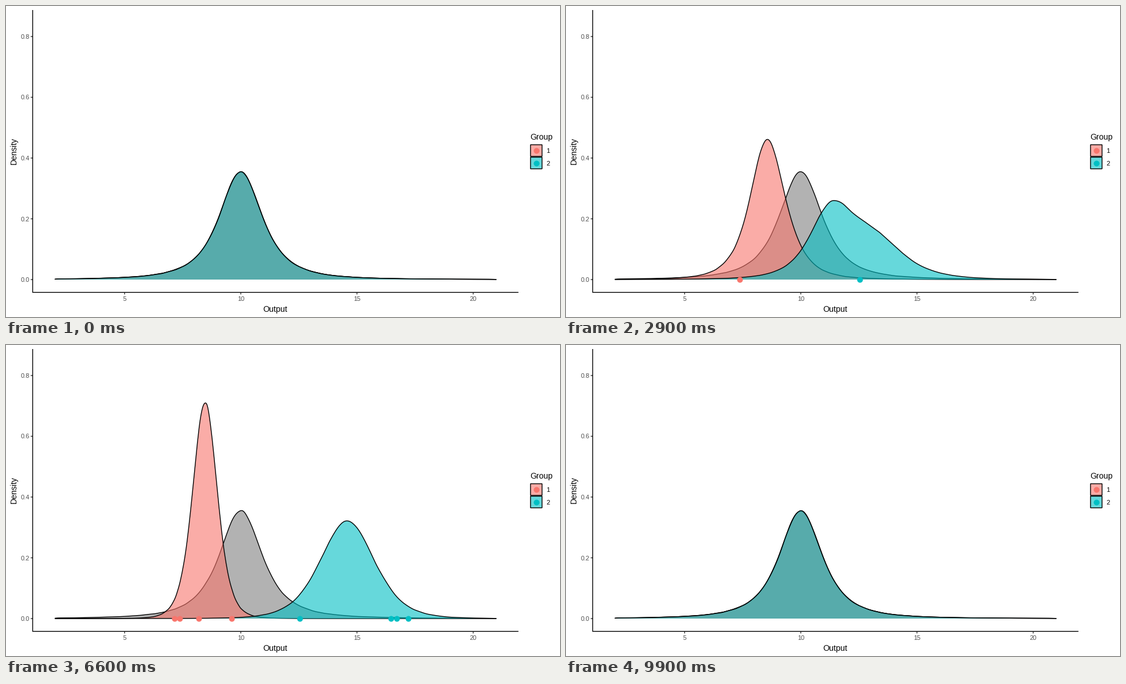
These frames come from a looping animation (960 px wide and 540 px high, 10 s). A matplotlib script:

```python
import numpy as np
import matplotlib.pyplot as plt
from matplotlib.animation import FuncAnimation
from matplotlib.patches import Polygon, Rectangle

W, H, DPI = 960, 540, 60
PT = 72 / DPI  # points per pixel
FRAMES, INTERVAL = 100, 100
STARTS = [9, 26, 43, 59, 76, 92]  # first frame of each transition
STEPS = 8
STATES = len(STARTS)

RED, CYAN, GREY = "#F8766D", "#00BFC4", "#4D4D4D"
LINE, DOT, TITLE, SMALL = 1.4, 10, 14, 11
plt.rcParams["font.family"] = ["Liberation Sans", "DejaVu Sans"]

# Observations, one more per state
OBS = {
    "red": [7.366, 8.18, 7.16, 9.594, 8.328],
    "cyan": [12.535, 16.458, 17.21, 16.72, 14.076],
}
STYLE = {"prior": ("black", .3), "red": (RED, .6), "cyan": (CYAN, .6)}

grid = np.linspace(2, 21, 512)
DX = grid[1] - grid[0]
rng = np.random.default_rng(7)


def smooth(y, bw):
    k = np.arange(-40, 41) * DX
    kernel = np.exp(-.5 * (k / bw) ** 2)
    return np.convolve(y, kernel / kernel.sum(), "same")


def posterior(data):
    """Degrees of freedom, centre and scale of the mean's Student t."""
    n = len(data)
    kappa, alpha, beta, mu = 1 + n, 1 + n / 2, 1.0, 10.0
    if n:
        x = np.array(data)
        m = x.mean()
        beta += .5 * ((x - m) ** 2).sum() + n * (m - 10) ** 2 / (2 * kappa)
        mu = (10 + n * m) / kappa
    return 2 * alpha, mu, np.sqrt(beta / (alpha * kappa))


def density(data):
    """Smoothed posterior density with a little sampling noise."""
    nu, mu, s = posterior(data)
    bw = .1 * s
    y = (1 + ((grid - mu) / s) ** 2 / nu) ** (-(nu + 1) / 2)
    y = smooth(y / (y.sum() * DX), bw)
    noise = smooth(rng.normal(size=grid.size), bw)
    y += .003 * noise / noise.std() * np.sqrt(y / s) / 1.7
    return np.maximum(y, 0)


curves = {g: [density(OBS.get(g, [])[:n]) for n in range(STATES)]
          for g in STYLE}


def px(v):
    return 4.15 + 40.27 * np.asarray(v)


def py(v):
    return 475 - 527.5 * np.asarray(v)


fig = plt.figure(figsize=(W / DPI, H / DPI), dpi=DPI, facecolor="white")
ax = fig.add_axes([0, 0, 1, 1])
ax.set_xlim(0, W)
ax.set_ylim(H, 0)
ax.axis("off")


def stroke(xs, ys, color="black", z=1):
    line, = ax.plot(xs, ys, color=color, lw=LINE * PT, zorder=z, snap=False,
                    solid_capstyle="butt", solid_joinstyle="round")
    return line


def dots(xs, ys, color, z):
    line, = ax.plot(xs, ys, "o", ms=DOT * PT, mew=0, color=color, zorder=z,
                    snap=False)
    return line


def label(x, y, s, size, color="black", ha="center", rot=0):
    ax.text(x, y, s, fontsize=size * PT, color=color, ha=ha, va="baseline",
            rotation=rot, rotation_mode="anchor")


# Axes
for v in np.arange(5) / 5:
    stroke([42.8, 46.3], [py(v)] * 2, "#333333")
    label(40.6, py(v) + 4, f"{v:.1f}", SMALL, GREY, "right")
for v in range(5, 25, 5):
    stroke([px(v)] * 2, [497.3, 500.8], "#333333")
    label(px(v), 512, str(v), SMALL, GREY)
stroke([46.3, 46.3, 888], [7, 497.3, 497.3], z=2)
label(467, 530.5, "Output", TITLE)
label(17.5, 252, "Density", TITLE, rot=90)

# Legend
label(908, 232, "Group", TITLE, ha="left")
for i, color in enumerate((RED, CYAN)):
    y = 251 + 21.6 * i
    key = (908.9, y - 10.1), 20, 20.2
    ax.add_patch(Rectangle(*key, fc=color, alpha=.6, lw=0))
    ax.add_patch(Rectangle(*key, fill=False, ec="black", lw=LINE * PT,
                           snap=False))
    dots([918.9], [y], color, 3)
    label(936.5, y + 4, str(i + 1), SMALL, ha="left")

# Densities and observations
base = [(px(21), py(0)), (px(2), py(0))]
shapes = {}
for z, (g, (color, alpha)) in enumerate(STYLE.items(), 2):
    fill = Polygon(base, closed=True, fc=color, alpha=alpha, lw=0,
                   zorder=2 * z)
    ax.add_patch(fill)
    shapes[g] = fill, stroke([], [], z=2 * z + 1)
points = {g: dots([], [], STYLE[g][0], 12) for g in OBS}


def timeline(frame):
    """Current state and the progress towards the next one."""
    for i, start in enumerate(STARTS):
        if frame < start + STEPS - 1:
            return i, max(0, frame - start + 1) / STEPS
    return 0, 0


def update(frame):
    state, t = timeline(frame)
    after = (state + 1) % STATES
    for g, (fill, line) in shapes.items():
        y = py((1 - t) * curves[g][state] + t * curves[g][after])
        pts = np.column_stack([px(grid), y])
        fill.set_xy(np.vstack([pts, base]))
        line.set_data(pts.T)
    # New points appear on arrival; all vanish as the reset begins
    count = 0 if t > 0 and after == 0 else state
    for g, marks in points.items():
        marks.set_data(px(OBS[g][:count]), [py(0)] * count)
    return []


anim = FuncAnimation(fig, update, frames=FRAMES, interval=INTERVAL,
                     repeat=True, repeat_delay=0)
plt.show()
```
